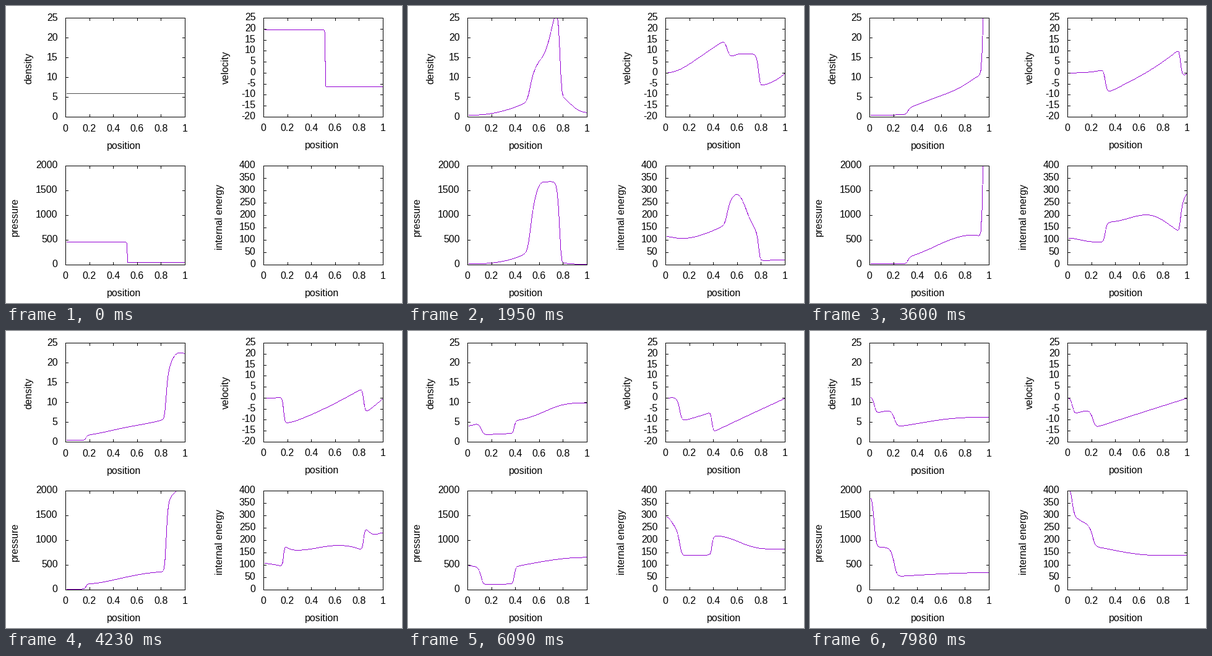
A matplotlib script for the animation above (8 s loop, 640 px wide and 480 px high).

```python
import numpy as np
import matplotlib.pyplot as plt
from matplotlib.animation import FuncAnimation
from matplotlib.collections import PolyCollection
from matplotlib.patches import Rectangle

# Two colliding gas streams in a closed tube (1D Euler equations, FORCE flux).
GAMMA = 1.4
CELLS = 100
DX = 1 / CELLS
CFL = 0.9
STATES = 267          # one time step per displayed state
STATE_MS = 30
INTERVAL = 20
FRAMES = 400

W, H, DPI = 640, 480, 100
BOX_W, BOX_H = 193, 160
TICK = 5
PURPLE = "#9400d3"
FIRST_GREY = "#505050"
FONT = dict(family="Liberation Sans", size=16 * 72 / DPI, color="black",
            va="baseline")


def primitive(q):
    rho, mom, energy = q
    u = mom / rho
    p = np.maximum((GAMMA - 1) * (energy - 0.5 * mom * u), 1e-6)
    return rho, u, p


def flux(q):
    rho, u, p = primitive(q)
    return np.array([q[1], q[1] * u + p, u * (q[2] + p)])


def with_walls(q):
    g = np.pad(q, ((0, 0), (1, 1)), mode="edge")
    g[1, 0] *= -1
    g[1, -1] *= -1
    return g


def advance(q):
    rho, u, p = primitive(q)
    k = CFL / np.max(np.abs(u) + np.sqrt(GAMMA * p / rho))   # dt / dx
    g = with_walls(q)
    f = flux(g)
    dq, df = np.diff(g), np.diff(f)
    q_mean = 0.5 * (g[:, 1:] + g[:, :-1])
    f_mean = 0.5 * (f[:, 1:] + f[:, :-1])
    lax = f_mean - 0.5 * dq / k
    richtmyer = flux(q_mean - 0.5 * k * df)
    return q - k * np.diff(0.5 * (lax + richtmyer))


def simulate():
    left = np.arange(1, CELLS + 1) <= 51
    rho = np.where(left, 5.99924, 5.99242)
    u = np.where(left, 19.5975, -6.19633)
    p = np.where(left, 460.894, 46.095)
    q = np.array([rho, rho * u, p / (GAMMA - 1) + 0.5 * rho * u * u])
    out = [(rho, u, p, np.zeros(CELLS))]     # energy is unknown at the start
    for _ in range(STATES - 1):
        q = advance(q)
        rho, u, p = primitive(q)
        out.append((rho, u, p, p / ((GAMMA - 1) * rho)))
    return out


history = simulate()
pos = np.arange(1, CELLS + 1) * DX

fig = plt.figure(figsize=(W / DPI, H / DPI), dpi=DPI, facecolor="white")
ax = fig.add_axes([0, 0, 1, 1])
ax.set_xlim(0, W)
ax.set_ylim(H, 0)
ax.axis("off")


def block(x, y, w, h):
    return [(x, y), (x + w, y), (x + w, y + h), (x, y + h)]


class Panel:
    """A framed plot placed in stage pixels."""

    def __init__(self, x, y, lo, hi, step, name, name_x, name_y, drop=0):
        self.x, self.y, self.lo, self.hi = x, y, lo, hi
        self.frame(step)
        base = y + BOX_H + drop
        for v in range(lo, hi + 1, step):
            ax.text(x - 12.5, int(self.py(v)) + 4 + drop, str(v),
                    ha="right", **FONT)
        for i in range(6):
            ax.text(x + BOX_W * i / 5, base + 23, f"{i / 5:g}",
                    ha="center", **FONT)
        ax.text(x + 94.5, base + 51, "position", ha="center", **FONT)
        ax.text(name_x, name_y, name, rotation=90, rotation_mode="anchor",
                ha="center", **FONT)

        self.edges = np.arange(int(self.px(pos[0])), x + BOX_W + 2)
        blank = np.zeros(len(self.edges) - 1)
        self.curve = ax.stairs(blank, self.edges, baseline=blank, fill=True,
                               facecolor=PURPLE, lw=0, snap=False, zorder=2)
        self.curve.set_clip_path(Rectangle((x, y + 1), BOX_W + 1, BOX_H,
                                           transform=ax.transData))

    def px(self, v):
        return self.x + 0.5 + BOX_W * v

    def py(self, v):
        return self.y + 0.5 + BOX_H * (self.hi - v) / (self.hi - self.lo)

    def frame(self, step):
        x, y, right, bottom = self.x, self.y, self.x + BOX_W, self.y + BOX_H
        parts = [block(x, y, BOX_W + 1, 1), block(x, bottom, BOX_W + 1, 1),
                 block(x, y, 1, BOX_H + 1), block(right, y, 1, BOX_H + 1)]
        for i in range(1, 5):
            t = int(self.px(i / 5))
            parts += [block(t, y, 1, TICK),
                      block(t, bottom + 1 - TICK, 1, TICK)]
        for v in range(self.lo + step, self.hi, step):
            t = int(self.py(v))
            parts += [block(x, t, TICK, 1),
                      block(right + 1 - TICK, t, TICK, 1)]
        ax.add_collection(PolyCollection(parts, facecolor="black", lw=0,
                                         snap=False, zorder=3),
                          autolim=False)

    def show(self, values):
        # One crisp vertical run of whole pixels per column.
        y = np.interp(self.edges, self.px(pos), self.py(values))
        run = np.maximum(1, np.round(np.abs(np.diff(y))))
        top = np.round((y[1:] + y[:-1] - run) / 2)
        self.curve.set_data(top + run, self.edges, top)


panels = [
    Panel(96, 19, 0, 25, 5, "density", 41, 100.5, drop=1),
    Panel(416, 19, -20, 25, 5, "velocity", 360, 99.5),
    Panel(96, 258, 0, 2000, 500, "pressure", 19, 340.5),
    Panel(416, 258, 0, 400, 50, "internal energy", 350, 340.5),
]


def update(k):
    n = min((k * INTERVAL + INTERVAL // 2) // STATE_MS, STATES - 1)
    for panel, values in zip(panels, history[n]):
        panel.show(values)
    panels[0].curve.set_facecolor(FIRST_GREY if n == 0 else PURPLE)
    return [panel.curve for panel in panels]


anim = FuncAnimation(fig, update, frames=FRAMES, interval=INTERVAL,
                     init_func=lambda: update(0), repeat=True, repeat_delay=0,
                     blit=False)
plt.show()
```
